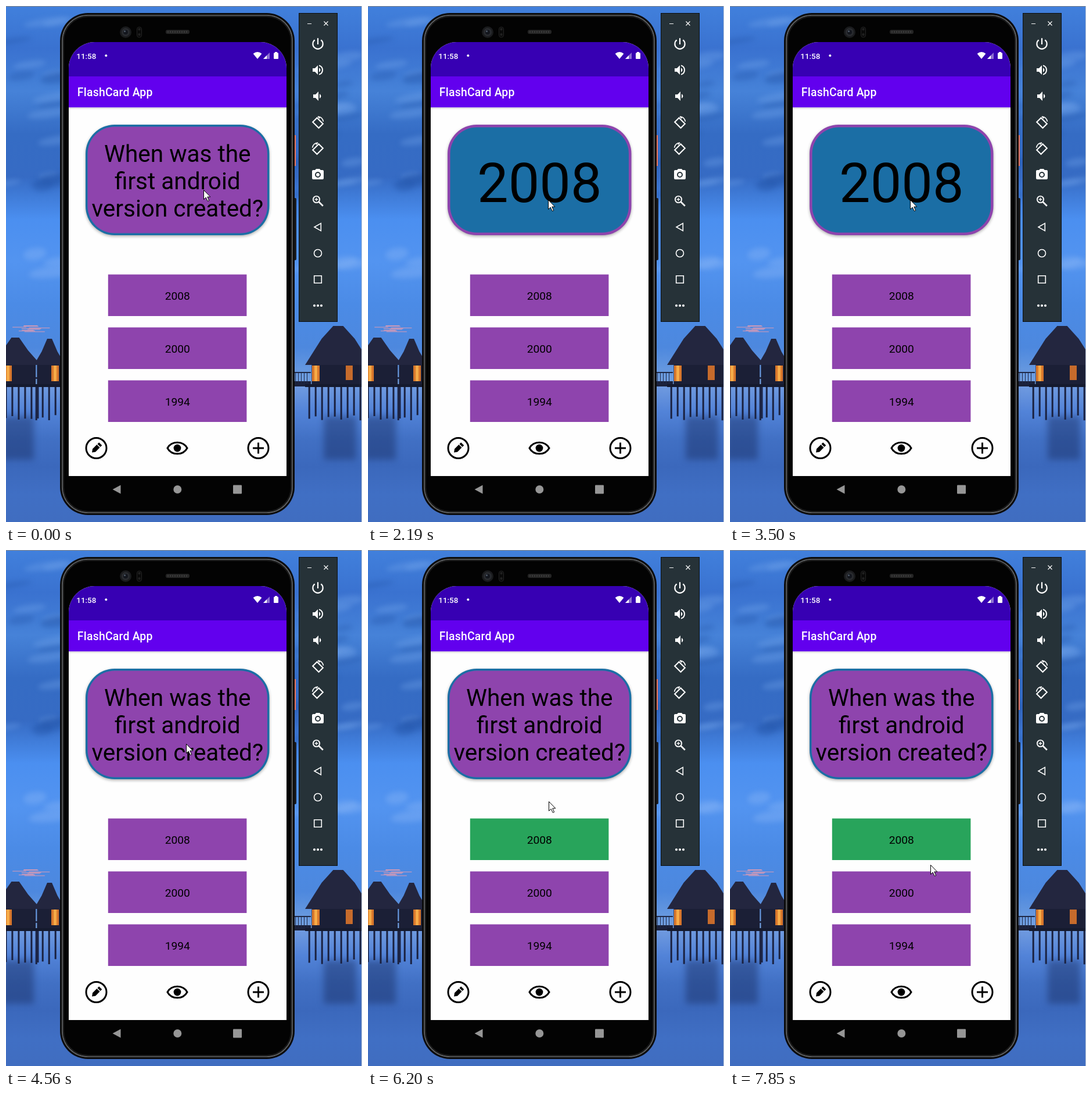
An HTML page with a canvas for the animation above (8 s loop, 613 px wide and 887 px high).

```html
<!DOCTYPE html>
<html lang="en">
<head>
<meta charset="utf-8">
<title>FlashCard App</title>
<style>
  html, body { margin: 0; width: 613px; height: 887px; overflow: hidden; background: #000; }
  canvas { display: block; }
</style>
</head>
<body>
<canvas id="stage" width="613" height="887"></canvas>
<script>
const W = 613, H = 887, LOOP = 8000;
const PURPLE = '#8e44ad', BLUE = '#1b6ea5', GREEN = '#28a45b';
const view = document.getElementById('stage').getContext('2d');
const base = document.createElement('canvas');
base.width = W;
base.height = H;
let c = base.getContext('2d');

// ---------- helpers ----------
function rect(x, y, w, h, color) {
  c.fillStyle = color;
  c.fillRect(x, y, w, h);
}

function round(x, y, w, h, r, fill, stroke, width = 1) {
  c.beginPath();
  c.roundRect(x, y, w, h, r);
  if (fill) { c.fillStyle = fill; c.fill(); }
  if (stroke) { c.strokeStyle = stroke; c.lineWidth = width; c.stroke(); }
}

function dot(x, y, r, color) {
  c.fillStyle = color;
  c.beginPath();
  c.arc(x, y, r, 0, 7);
  c.fill();
}

function ring(x, y, r, color, width) {
  c.strokeStyle = color;
  c.lineWidth = width;
  c.beginPath();
  c.arc(x, y, r, 0, 7);
  c.stroke();
}

function poly(color, ...pts) {
  c.fillStyle = color;
  c.beginPath();
  for (let i = 0; i < pts.length; i += 2) c.lineTo(pts[i], pts[i + 1]);
  c.closePath();
  c.fill();
}

function text(str, x, y, size, color, weight = 400, align = 'center', spacing = 0) {
  c.font = `${weight} ${size}px Roboto, sans-serif`;
  c.textAlign = align;
  c.letterSpacing = spacing + 'px';
  c.fillStyle = color;
  c.fillText(str, x, y);
  c.letterSpacing = '0px';
}

// Path on a 24-unit grid, centred at x, y
function icon(d, x, y, scale, color, line = 0, turn = 0) {
  c.save();
  c.translate(x, y);
  c.rotate(turn);
  c.scale(scale, scale);
  c.translate(-12, -12);
  const path = new Path2D(d);
  c.fillStyle = c.strokeStyle = color;
  c.lineWidth = line;
  if (line) c.stroke(path); else c.fill(path, 'evenodd');
  c.restore();
}

function ramp(y0, y1, ...colors) {
  const g = c.createLinearGradient(0, y0, 0, y1);
  colors.forEach((col, i) => g.addColorStop(i / (colors.length - 1), col));
  return g;
}

let seed = 7;
const rnd = () => (seed = seed * 16807 % 2147483647) / 2147483647;

// ---------- wallpaper ----------
function clouds(count, y0, y1, color) {
  c.fillStyle = color;
  for (let i = 0; i < count; i++) {
    c.beginPath();
    c.ellipse((i % 2 ? 505 : 0) + rnd() * 100, y0 + rnd() * (y1 - y0), 16 + rnd() * 34, 3 + rnd() * 8, -0.15, 0, 7);
    c.fill();
  }
}

// Thatched hut on stilts: centre, half width, ridge height, window place
function hut(x, half, top, win) {
  const eave = 617;
  rect(x - half * 0.8, eave - 2, half * 1.6, 36, '#1b1f36');
  rect(win, eave + 1, 13, 27, '#d8772c');
  rect(win + 4, eave + 1, 5, 27, '#f6ab48');
  poly('#23263f', x - half, eave, x - half * 0.5, top + 22, x - half * 0.15, top,
    x + half * 0.15, top, x + half * 0.5, top + 22, x + half, eave);
  rect(x - half, 650, half * 2, 5, '#151a2e');
  for (let px = x - half * 0.9; px < x + half; px += 11) rect(px, 655, 3, 48 + rnd() * 12, '#1a2140');
}

function wallpaper() {
  rect(0, 0, W, 660, ramp(0, 660, '#4180dc', '#3a72d0', '#4682d8', '#356cc4',
    '#366bc4', '#4b8ff0', '#5394f0', '#4b8be6', '#4d88de', '#7aa5e0'));
  c.save();
  c.filter = 'blur(4px)';
  clouds(18, 10, 330, 'rgba(120,168,235,.32)');
  clouds(16, 60, 330, 'rgba(36,84,168,.32)');
  clouds(6, 425, 460, 'rgba(140,184,245,.35)');
  c.restore();
  for (let i = 0; i < 9; i++) rect(4 + rnd() * 36, 549 + i * 1.3, 18 + rnd() * 18, 1, '#d99bb5');

  rect(0, 650, W, 237, ramp(650, 887, '#729ce0', '#5283d8', '#4170c4', '#3b68bc', '#406fc4', '#406dc0'));
  c.save();
  c.filter = 'blur(6px)';
  for (const x of [20, 575]) rect(x - 28, 705, 56, 75, 'rgba(18,32,80,.38)');
  c.restore();

  rect(40, 638, 60, 3, '#222a46');
  rect(490, 629, 35, 2, '#202947');
  rect(490, 645, 35, 9, '#1b213a');
  for (let x = 498; x < 522; x += 5) rect(x, 629, 1, 20, '#202947');
  hut(16, 44, 570, -3);
  hut(75, 27, 572, 78);
  hut(572, 57, 550, 527);
  rect(585, 618, 12, 25, '#c66b2c');

  rect(0, 0, W, 1, '#8f8b86');
  rect(612, 0, 1, H, '#b9c4d4');
}

// ---------- phone ----------
function phone() {
  rect(495, 222, 4, 53, '#ee7358');
  rect(495, 86, 2, 40, '#333');
  round(494, 330, 6, 107, 2, '#1b1c20');
  round(93, 12, 404, 863, 48, '#0c0c0c');
  round(97, 16, 396, 855, 44, '#060606', '#66686a', 1.6);
  round(99, 18, 392, 851, 42, '#030303', '#1c1c1c', 2);

  dot(206, 45, 10, '#1a1b1d');
  dot(206, 45, 7, '#292b2f');
  dot(206, 45, 4, '#13161d');
  dot(204.5, 43.5, 1.5, '#505a68');
  round(225.5, 36, 8, 18, 4, '#090909', '#242424', 1);
  for (const y of [40, 49]) dot(229.5, y, 2.2, '#202020');
  round(275, 41, 41, 7, 3, '#252525');
  for (let x = 278; x < 314; x += 4) rect(x, 43, 2, 3, '#3a3a3a');

  c.save();
  c.beginPath();
  c.roundRect(108, 62, 375, 746, [45, 45, 0, 0]);
  c.clip();
  rect(108, 62, 375, 746, '#fefefe');
  rect(108, 62, 375, 59, '#3700b3');
  rect(108, 121, 375, 53.5, '#6200ee');
  rect(108, 174.5, 375, 3.5, ramp(174.5, 178, '#d6d6d6', '#fefefe'));
  c.restore();

  text('11:58', 121.3, 90.5, 13.4, '#fff', 500, 'left');
  dot(172.3, 85.3, 2, '#fff');
  icon('M12 18L4.6 9q7.4-5.8 14.8 0z', 433, 85, 1, '#fff');
  poly('#8d70d1', 443, 91, 454, 80, 454, 91);
  poly('#fff', 443, 91, 449, 85, 449, 91);
  round(461, 80.5, 8, 10.5, 1, '#fff');
  rect(463, 79, 4, 2, '#fff');
  text('FlashCard App', 122.8, 155.3, 19.4, '#fff', 500, 'left', 0.24);

  // bottom actions
  ring(155.5, 760, 17.5, '#000', 3);
  icon('M1.5 12l5-3.6h10.4v7.2H6.5zM18.4 8.4h3.8v7.2h-3.8z', 155.5, 760, 1, '#000', 0, -Math.PI / 4);
  icon('M-5 12C2-1 22-1 29 12C22 25 2 25-5 12z', 295, 760, 1, '#000', 3);
  dot(295, 760, 6.4, '#000');
  ring(434.5, 760, 17.5, '#000', 3);
  rect(425, 758.5, 19, 3, '#000');
  rect(433, 750.5, 3, 19, '#000');

  poly('#969696', 183.5, 831, 197.5, 823.5, 197.5, 838.5);
  dot(295.3, 831, 7, '#969696');
  round(391, 823.5, 15, 15, 1, '#969696');
}

// ---------- emulator toolbar ----------
function toolbar() {
  rect(504, 12, 67, 531, '#0b0f11');
  rect(505, 13, 65, 529, '#263238');
  const ink = '#fff', x = 537;
  rect(519, 30, 7, 1, ink);
  icon('M8.5 8.5l7 7M15.5 8.5l-7 7', 551, 30, 1, ink, 1.2);
  icon('M12 3v10M7 5.9a8 8 0 1 0 10 0', x, 65, 1.08, ink, 2);
  icon('M3 9v6h4l5 5V4L7 9zM14 8q5 4 0 8zM14 3.2v2.1q5 1.7 5 6.7t-5 6.7v2.1q7-2 7-8.8t-7-8.8z', x, 110, 1, ink);
  icon('M5 9v6h4l5 5V4L9 9zM16 8q5 4 0 8z', x - 1, 155, 1, ink);
  for (const [y, dir] of [[200, 1], [245, -1]]) {
    c.save();
    c.translate(x, y);
    c.scale(dir, 1);
    icon('M7 5h10v14H7z', 0, 1, 1.04, ink, 2, -Math.PI / 4);
    icon('M12 1.5q8 .5 10 9M12 1.5l3.5 3.2', 0, 0, 0.95, ink, 1.6);
    c.restore();
  }
  icon('M9 2L7.2 4H4q-2 0-2 2v12q0 2 2 2h16q2 0 2-2V6q0-2-2-2h-3.2L15 2zM12 7a5 5 0 1 1 0 10a5 5 0 1 1 0-10z', x, 290, 1, ink);
  dot(x, 290, 3, ink);
  ring(534.5, 332.5, 5.6, ink, 1.9);
  icon('M13.6 13.6l6.4 6.4', x, 335, 1.1, ink, 2.4);
  icon('M9 12h6M12 9v6', 534.5, 332.5, 1, ink, 1.3);
  icon('M6 12L17.3 5.6V18.4z', x, 380, 1, ink, 1.6);
  ring(x, 425, 6.5, ink, 1.6);
  icon('M5.7 5.7h12.6v12.6H5.7z', x, 470, 1, ink, 1.6);
  for (const dx of [-6, 0, 6]) dot(x + dx, 515, 2.1, ink);
}

// ---------- moving parts ----------
const flips = [1640, 2690, 3500, 4560, 6440, 7340];
const RIGHT_AT = 5500, STEP = 130;

// Pointer glides in discrete steps; pow shapes the speed
const glides = [
  { at: 4710, steps: 5, x: 314, y: 502, pow: 0.8 },
  { at: 6080, steps: 2, x: 306, y: 342, pow: 1.2 },
  { at: 6710, steps: 1, x: 321, y: 326, pow: 1 },
  { at: 6830, steps: 1, x: 280, y: 335, pow: 1 },
  { at: 6950, steps: 2, x: 300, y: 338, pow: 1 },
  { at: 7460, steps: 4, x: 345, y: 541, pow: 2 }
];

// Zigzag shake that settles on the card
function shake(t) {
  const k = Math.floor((t - 280) / 137);
  if (k < 0) return [340, 316];
  if (k > 6) return [310, 333];
  return [312 + 42 * Math.cos(k * 0.75), 319 + 2 * k - 15 * (-1) ** k];
}

function pointerAt(t) {
  let [x, y] = shake(t);
  for (const g of glides) {
    if (t < g.at) break;
    const n = Math.min(g.steps, Math.floor((t - g.at) / STEP) + 1);
    const p = (n / g.steps) ** g.pow;
    x += (g.x - x) * p;
    y += (g.y - y) * p;
  }
  return [Math.round(x), Math.round(y)];
}

function card(answer) {
  c.save();
  c.shadowColor = 'rgba(0,0,0,.32)';
  c.shadowBlur = 5;
  c.shadowOffsetY = 2;
  round(137, 204, 316.5, 190, 50, answer ? PURPLE : BLUE);
  c.restore();
  if (answer) {
    round(141.5, 208.5, 307.5, 181, 45.5, BLUE);
    text('2008', 295.3, 336.5, 95.4, '#000');
  } else {
    round(140.5, 207.5, 309.5, 183, 46.5, PURPLE);
    ['When was the', 'first android', 'version created?'].forEach((line, i) =>
      text(line, 295.3, 267.5 + i * 47.4, 40.5, '#000'));
  }
}

function choices(right) {
  ['2008', '2000', '1994'].forEach((label, i) => {
    const y = 461.5 + i * 91;
    rect(175.8, y, 238.6, 71.5, right && i === 0 ? GREEN : PURPLE);
    text(label, 295.2, y + 43.5, 19.2, '#000');
  });
}

const arrow = new Path2D('M0 0V16L3.7 12.6L6.8 19L9.2 18L6.3 11.6H11.3Z');
function pointer(x, y) {
  c.save();
  c.translate(x + 0.5, y + 0.5);
  c.fillStyle = '#fff';
  c.fill(arrow);
  c.strokeStyle = '#000';
  c.lineWidth = 1;
  c.stroke(arrow);
  c.restore();
}

wallpaper();
phone();
toolbar();
c = view;

const start = performance.now();
function frame() {
  const t = (performance.now() - start) % LOOP;
  c.drawImage(base, 0, 0);
  card(flips.filter(f => f <= t).length % 2 === 1);
  choices(t >= RIGHT_AT);
  pointer(...pointerAt(t));
  requestAnimationFrame(frame);
}
frame();
</script>
</body>
</html>
```
